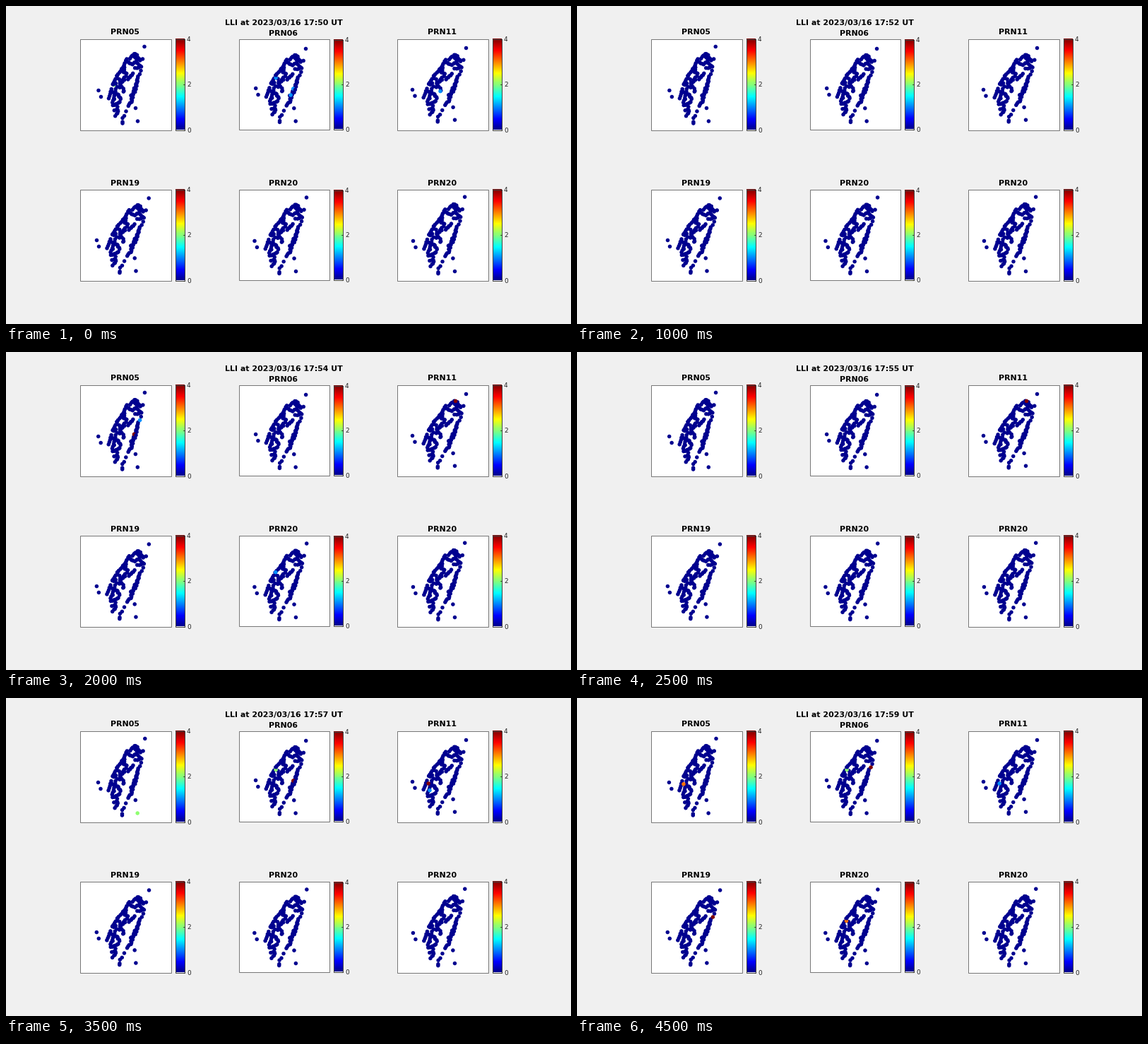
Animation, 800 px wide and 450 px high, one loop 5 s. Source, as a matplotlib script:

```python
import numpy as np
import matplotlib.pyplot as plt
from matplotlib.animation import FuncAnimation
from matplotlib.colors import ListedColormap
from matplotlib.patches import Rectangle

W, H, DPI = 800, 450, 100
FRAMES, INTERVAL = 10, 500
PX = 72 / DPI
INK = "#262626"
NAMES = ["PRN05", "PRN06", "PRN11", "PRN19", "PRN20", "PRN20"]

plt.rcParams["font.family"] = "DejaVu Sans"

# 64-step jet colour map
level = 4 * np.arange(1, 65) / 64
JET = np.stack([np.clip(1.5 - abs(level - c), 0, 1) for c in (3, 2, 1)], axis=1)

# Three outlying stations (north, west, south) fix the affine map of each panel
BASE = np.array([(196, 57.5), (131, 119.5), (186.5, 163)])
ANCHORS = np.array([
    BASE,
    [(424.5, 60.5), (353.7, 116.5), (410.2, 163)],
    [(651.5, 59.5), (575.5, 118.5), (635.5, 161.2)],
    [(202.2, 272), (128.5, 331.5), (184, 375)],
    [(425.5, 271), (352, 332.5), (410.5, 375.5)],
    [(649.6, 270.2), (576.5, 332.5), (635.5, 375.5)],
])
DRIFT = np.outer([1, 0.3, 0, 0.4, 0.4, 0.2], [1, -0.6, -0.4])

# Station chains: number of stations, then the bends of the chain
CHAINS = [
    (9, (175, 74), (183.5, 67), (190, 77)),
    (6, (182, 73), (186, 76), (181, 81)),
    (7, (186, 82), (192, 86), (183, 88)),
    (11, (170.5, 75), (168, 83), (157.5, 98.5)),
    (5, (171, 79), (179, 82)),
    (6, (172, 103.5), (180, 95.5)),
    (10, (168.5, 87), (165, 94), (171, 96), (165, 106)),
    (6, (167, 105), (163, 111), (167, 120)),
    (7, (154.5, 103.5), (150.5, 112), (156, 110)),
    (6, (161, 104), (162, 115), (157.5, 114)),
    (5, (149.5, 117), (145.5, 131.5)),
    (7, (156, 117.5), (150.5, 137)),
    (8, (154.5, 123), (159, 125), (162, 132)),
    (7, (152, 141), (161.5, 136)),
    (7, (154, 147), (160, 148), (154.5, 155)),
    (14, (187.5, 99), (183, 114), (179, 130)),
    (5, (186.5, 106), (182.5, 122)),
    (8, (177, 127), (179, 134), (173, 141)),
]
LONERS = [(196, 57.5), (131, 119.5), (134.5, 128.5), (183.5, 144.5), (165, 158.5),
          (165, 164), (165, 166), (170, 149), (167.5, 155.5), (193.5, 75), (191, 91.5)]

SITES = {
    "west": (153.3, 111.7), "port": (157.4, 102.3), "hill": (157.5, 98.5),
    "bay": (151.3, 121.8), "plain": (153.4, 131.8), "river": (157.9, 142.6),
    "south": (156.8, 146.7), "lake": (166.3, 121.2), "north": (183.1, 68),
    "cape": (189.4, 96.4), "cliff": (181.4, 116.4), "shore": (184, 117.6),
    "delta": (178.3, 125.8), "isle": (186.5, 163),
}

# For each minute, one dict of lit sites per panel
NONE = {}
EVENTS = [
    [dict(west=2), dict(port=1, cliff=1, delta=1), dict(lake=1)],
    [dict(west=1, shore=3), dict(port=4), NONE, NONE, dict(hill=1)],
    [],
    [dict(cape=4), NONE, dict(north=4), dict(shore=2)],
    [dict(cliff=4, cape=1), NONE, dict(north=4), NONE, dict(hill=1)],
    [NONE, NONE, dict(north=4)],
    [dict(west=2, bay=1, cliff=1), dict(port=1, south=4),
     dict(north=4, bay=1, river=1), dict(port=1), dict(cliff=1)],
    [dict(isle=2), dict(port=2, cliff=4), dict(bay=4, plain=1)],
    [NONE, dict(port=2)],
    [dict(bay=3), dict(port=2, cape=4), dict(bay=1), dict(cape=4), dict(port=3)],
]


def chain(n, *bends):
    """Spread n stations evenly along a bent line."""
    p = np.array(bends, float)
    dist = np.r_[0, np.cumsum(np.hypot(*np.diff(p, axis=0).T))]
    t = np.linspace(0, dist[-1], n)
    return np.stack([np.interp(t, dist, p[:, i]) for i in (0, 1)], axis=1)


def homogeneous(p):
    return np.c_[p, np.ones(len(p))]


rng = np.random.default_rng(5)
coast = np.vstack([chain(*c) for c in CHAINS])
coast += rng.uniform(-0.8, 0.8, coast.shape)
sites = np.array(list(SITES.values()))
stations = np.vstack([sites[:1], coast, LONERS, sites[1:]])
count = len(stations)
first_site = count - len(sites)
index = {name: first_site + i if i else 0 for i, name in enumerate(SITES)}
weights = homogeneous(stations) @ np.linalg.inv(homogeneous(BASE))

fig = plt.figure(figsize=(W / DPI, H / DPI), dpi=DPI, facecolor="#f0f0f0")
ax = fig.add_axes([0, 0, 1, 1])
ax.axis("off")


def box(x, y, w, h, face, edge, z):
    ax.add_patch(Rectangle((x, y), w, h, fc=face, ec=edge, lw=PX, zorder=z))


def label(x, y, text, size, **kw):
    return ax.text(x, y, text, fontsize=size * PX, va="baseline", **kw)


def heading(x, y, text):
    return label(x, y, text, 11, ha="center", weight="bold", color="black")


def panel(i, name):
    row, col = divmod(i, 3)
    inset = int(col == 1)  # the middle column is one pixel smaller
    x, y = (104.5, 329.5, 553.5)[col], 46.5 + 213 * row
    size = 129 - inset
    box(x, y, size, size, "white", "#777777", 1)
    heading(x + 64 - inset, y - 6 + inset, name)

    bar, top, height = x + size + 6, y + inset, 129 - 2 * inset
    ax.imshow(np.arange(64)[:, None], cmap=ListedColormap(JET), aspect="auto",
              interpolation="nearest", origin="lower", zorder=1,
              extent=(bar, bar + 13, top + height, top))
    box(bar, top, 13, height, "none", "#444444", 2)
    for value in (0, 2, 4):
        ty = top + height * (1 - value / 4)
        ax.plot([bar + 11.5, bar + 13], [ty, ty], color=INK, lw=PX * 0.8, zorder=3)
        label(bar + 16.5, ty + 3.2, str(value), 9, color=INK)


for i, name in enumerate(NAMES):
    panel(i, name)
title = heading(393.3, 27, "")
dots = ax.scatter(np.zeros(6 * count), np.zeros(6 * count),
                  s=(5.5 * PX) ** 2, linewidths=0, zorder=4)
ax.set_xlim(0, W)
ax.set_ylim(H, 0)


def draw(k):
    title.set_text(f"LLI at 2023/03/16 17:{50 + k} UT")
    anchors = ANCHORS.copy()
    anchors[:, :, 0] += DRIFT * k / (FRAMES - 1)
    dots.set_offsets(np.vstack([weights @ a for a in anchors]))
    values = np.zeros(6 * count, int)
    for i, lit in enumerate(EVENTS[k]):
        for site, value in lit.items():
            values[i * count + index[site]] = value
    dots.set_facecolors(JET[np.minimum(values * 16, 63)])
    return title, dots


anim = FuncAnimation(fig, draw, frames=FRAMES, interval=INTERVAL,
                     init_func=lambda: draw(0), repeat=True, repeat_delay=0)
plt.show()
```
